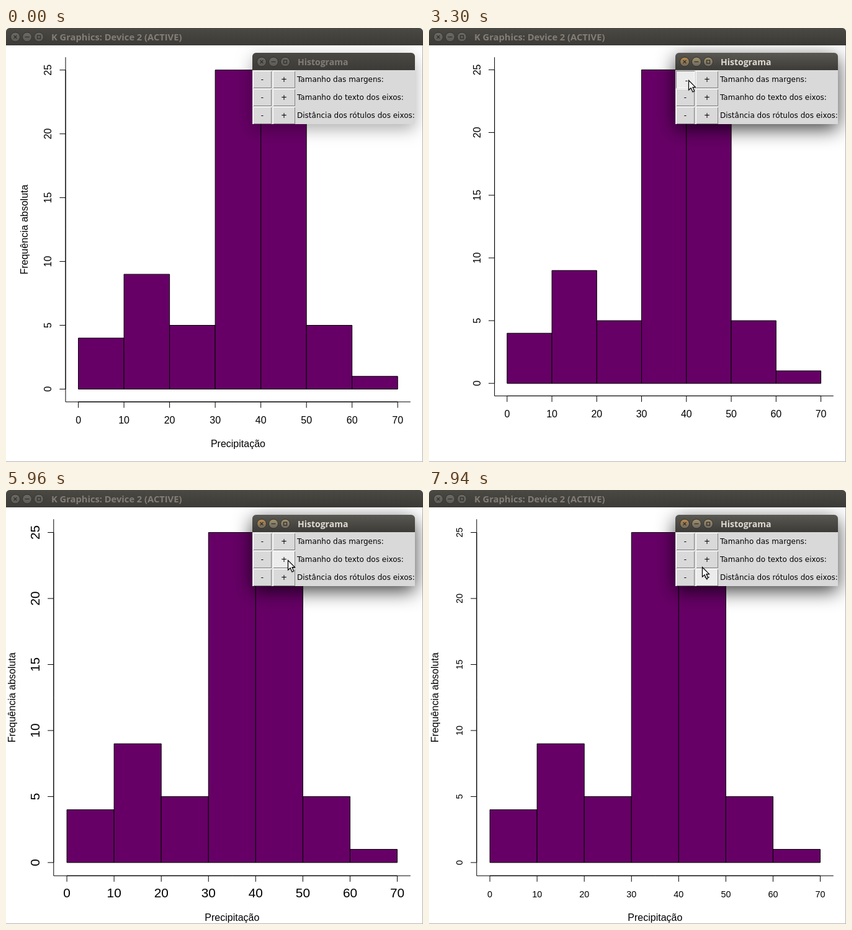
Write an HTML page with a canvas that moves like this. It is 672 px wide and 700 px high and loops after 7990 ms.

```html
<!DOCTYPE html>
<html lang="pt">
<head>
<meta charset="utf-8">
<style>
  html, body { margin: 0; width: 100%; height: 100%; overflow: hidden; background: #fff; }
  canvas { display: block; }
</style>
</head>
<body>
<canvas id="stage" width="672" height="700"></canvas>
<script>
const ctx = document.getElementById('stage').getContext('2d');
const LOOP = 7990, LINE = 19.2, TOP = 28, SIZE = 671;
const COUNTS = [4, 9, 5, 25, 21, 5, 1];
const LABELS = ['Tamanho das margens:', 'Tamanho do texto dos eixos:', 'Distância dos rótulos dos eixos:'];

// Alternating press and release times; each release changes a setting by one step.
const CLICKS = [
  { key: 'margin', step: 0.5, times: [1790, 1850, 2030, 2190, 2250, 2410] },
  { key: 'margin', step: -0.5, times: [2930, 3010, 3230, 3300, 3460, 3520, 3940, 4030, 4190, 4280] },
  { key: 'scale', step: 0.1, times: [5390, 5500, 5590, 5680, 5800, 5890, 6060, 6150, 6260, 6370] },
  { key: 'scale', step: -0.1, times: [6820, 6900, 6990, 7160, 7350, 7350, 7420, 7500, 7570, 7640, 7710, 7710] }
];
// Spans in which the plot is still without its axis titles.
const REDRAWS = [[3300, 3390], [5890, 5960], [6900, 6990], [7640, 7710]];

// first step, last step, number of steps, destination
const MOVES = [
  [1050, 1650, 11, 443, 77], [2570, 2860, 5, 418, 84], [4830, 5050, 5, 454, 113],
  [6540, 6650, 3, 421, 114], [7780, 7940, 3, 440, 124]
];

function stateAt(t) {
  const redrawing = REDRAWS.some(([from, to]) => t >= from && t < to);
  const state = { margin: 5, scale: 1, pressed: redrawing, titles: !redrawing };
  for (const { key, step, times } of CLICKS) {
    const passed = times.filter(time => time <= t).length;
    state[key] += step * Math.floor(passed / 2);
    if (passed % 2) state.pressed = true;
  }
  return state;
}

function cursorAt(t) {
  let x = 662, y = 211;
  for (const [start, end, steps, toX, toY] of MOVES) {
    if (t < start) break;
    const k = Math.min(1, (Math.floor((t - start) / (end - start) * (steps - 1) + 1e-6) + 1) / steps);
    x += (toX - x) * k;
    y += (toY - y) * k;
  }
  return [Math.round(x), Math.round(y)];
}

function text(str, x, y, font, color = '#000', align = 'left', turned = false) {
  ctx.save();
  ctx.translate(x, y);
  if (turned) ctx.rotate(-Math.PI / 2);
  ctx.font = font;
  ctx.fillStyle = color;
  ctx.textAlign = align;
  ctx.fillText(str, 0, 0);
  ctx.restore();
}

function fill(color, x, y, w, h) {
  ctx.fillStyle = color;
  ctx.fillRect(x, y, w, h);
}

function line(...points) {
  ctx.beginPath();
  points.forEach(([x, y]) => ctx.lineTo(x, y));
  ctx.stroke();
}

function drawPlot({ margin, scale, titles }) {
  const left = margin * LINE, bottom = TOP + SIZE - margin * LINE;
  const top = TOP + LINE, right = SIZE - LINE;
  const px = v => left + (right - left) * (v + 2.8) / 75.6;
  const py = v => bottom - (bottom - top) * (v + 1) / 27;
  const font = size => `${size}px "Liberation Sans", Arial, sans-serif`;

  ctx.strokeStyle = '#000';
  ctx.lineWidth = 1;
  ctx.fillStyle = '#660066';
  COUNTS.forEach((n, i) => {
    ctx.beginPath();
    ctx.rect(px(i * 10), py(n), px(10) - px(0), py(0) - py(n));
    ctx.fill();
    ctx.stroke();
  });

  line([px(0), bottom], [px(70), bottom]);
  for (let v = 0; v <= 70; v += 10) {
    line([px(v), bottom], [px(v), bottom + LINE / 2]);
    text(v, px(v), bottom + 1.8 * LINE, font(16 * scale), '#000', 'center');
  }
  line([left, py(0)], [left, py(25)]);
  for (let v = 0; v <= 25; v += 5) {
    line([left, py(v)], [left - LINE / 2, py(v)]);
    text(v, left - 1.2 * LINE, py(v), font(16 * scale), '#000', 'center', true);
  }
  line([left, top], [left, bottom], [right, bottom]);

  if (titles) {
    text('Precipitação', (left + right) / 2, bottom + 3.8 * LINE, font(16), '#000', 'center');
    text('Frequência absoluta', left - 3.2 * LINE, (top + bottom) / 2, font(16), '#000', 'center', true);
  }
}

function drawTitleBar(x, y, w, title, fontSize, active) {
  const bar = ctx.createLinearGradient(0, y, 0, y + 28);
  bar.addColorStop(0, active ? '#5a5852' : '#4a4943');
  bar.addColorStop(1, '#3c3b37');
  ctx.fillStyle = bar;
  ctx.beginPath();
  ctx.roundRect(x, y, w, 28, [6, 6, 0, 0]);
  ctx.fill();

  for (let i = 0; i < 3; i++) {
    const cx = x + 15 + i * 19, cy = y + 14.5;
    const knob = ctx.createLinearGradient(0, cy - 7, 0, cy + 7);
    knob.addColorStop(0, active ? (i ? '#a2916d' : '#b98b4c') : '#6a6963');
    knob.addColorStop(1, active ? '#6d6960' : '#5c5b56');
    ctx.fillStyle = knob;
    ctx.strokeStyle = '#32312d';
    ctx.lineWidth = 1;
    ctx.beginPath();
    ctx.arc(cx, cy, 7.5, 0, 7);
    ctx.fill();
    ctx.stroke();
    ctx.lineWidth = 1.3;
    if (i === 0) {
      line([cx - 2.5, cy - 2.5], [cx + 2.5, cy + 2.5]);
      line([cx + 2.5, cy - 2.5], [cx - 2.5, cy + 2.5]);
    } else if (i === 1) {
      line([cx - 3.5, cy], [cx + 3.5, cy]);
    } else {
      ctx.strokeRect(cx - 2.5, cy - 2.5, 5, 5);
    }
  }
  text(title, x + 73, y + 20, `bold ${fontSize}px "Open Sans", "Noto Sans", sans-serif`,
    active ? '#dfdbd2' : '#837d76');
}

function drawButton(sign, x, y, w, hover, down) {
  fill(down ? '#828282' : '#fff', x, y, w, 28);
  fill(down ? '#fff' : '#828282', x + 1, y + 1, w - 1, 27);
  fill(hover ? '#ececec' : '#d9d9d9', x + 1, y + 1, w - 2, 26);
  const shift = down ? 2 : 0;
  text(sign, x + w / 2 + shift, y + 18 + shift, '12px "DejaVu Sans", sans-serif', '#000', 'center');
}

function drawDialog(cursor, pressed, active) {
  ctx.save();
  ctx.shadowColor = active ? 'rgba(0,0,0,.75)' : 'rgba(0,0,0,.32)';
  ctx.shadowBlur = active ? 30 : 26;
  ctx.shadowOffsetY = 8;
  ctx.fillStyle = '#d9d9d9';
  ctx.beginPath();
  ctx.roundRect(397, 40, 262, 115, [6, 6, 0, 0]);
  ctx.fill();
  ctx.restore();
  drawTitleBar(397, 40, 262, 'Histograma', 14, active);

  const [cx, cy] = cursor || [0, 0];
  LABELS.forEach((label, row) => {
    const y = 69 + row * 29;
    const inRow = Math.floor((cy - 66) / 29) === row;
    for (const [sign, x, w] of [['-', 398, 30], ['+', 430, 36]]) {
      const hover = inRow && cx >= x && cx < x + w;
      drawButton(sign, x, y, w, hover, hover && pressed);
    }
    text(label, 469, y + 18, '12px "DejaVu Sans", sans-serif');
  });
}

function drawCursor(x, y) {
  ctx.save();
  ctx.translate(x + 0.5, y + 0.5);
  ctx.shadowColor = 'rgba(0,0,0,.3)';
  ctx.shadowBlur = 2;
  ctx.shadowOffsetY = 1;
  ctx.fillStyle = '#fff';
  ctx.strokeStyle = '#000';
  ctx.lineWidth = 1.2;
  ctx.beginPath();
  [[0, 0], [0, 15.5], [3.7, 12.2], [6.5, 18.5], [9.2, 17.3], [6.5, 11.2], [11, 11.2]]
    .forEach(([px, py]) => ctx.lineTo(px, py));
  ctx.closePath();
  ctx.fill();
  ctx.shadowColor = 'transparent';
  ctx.stroke();
  ctx.restore();
}

function draw(t) {
  const state = stateAt(t);
  const cursor = t >= 1050 ? cursorAt(t) : null;
  fill('#fff', 0, 0, 672, 700);
  drawPlot(state);
  fill('#b4b4b4', 671, 28, 1, 672);
  fill('#b4b4b4', 0, 699, 672, 1);
  drawTitleBar(0, 0, 672, 'K Graphics: Device 2 (ACTIVE)', 14.7, false);
  drawDialog(cursor, state.pressed, t >= 1790);
  if (cursor) drawCursor(...cursor);
}

const began = performance.now();
function tick() {
  draw((performance.now() - began) % LOOP);
  requestAnimationFrame(tick);
}
tick();
</script>
</body>
</html>
```
